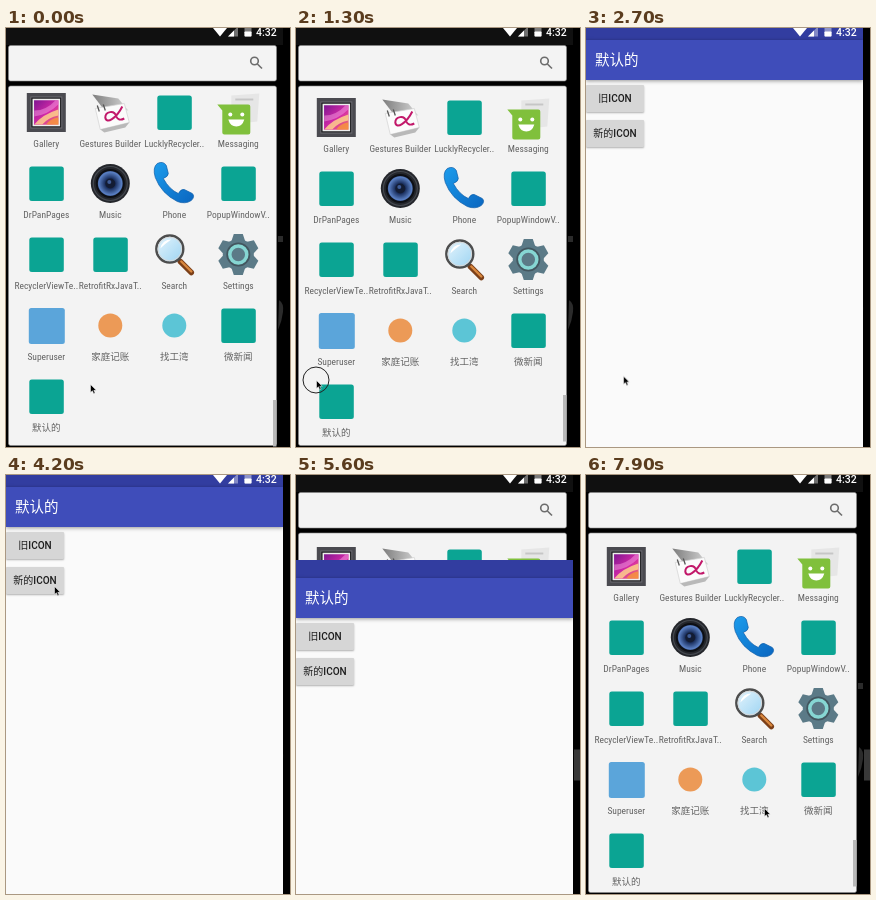
Animation of 284 by 419 pixels, one loop 8 s. Source, as an HTML page:

```html
<!DOCTYPE html>
<html lang="zh-CN">
<head>
<meta charset="utf-8">
<title>App drawer</title>
<style>
  html, body { margin: 0; width: 100%; height: 100%; overflow: hidden; background: #000; }
  body { position: relative; font-family: Roboto, "Noto Sans CJK SC", "Noto Sans CJK", sans-serif; }
  svg { position: absolute; left: 0; top: 0; display: block; }
  .label { font-size: 9.5px; font-family: "Roboto Condensed", Roboto, "Noto Sans CJK SC", "Noto Sans CJK", sans-serif; font-stretch: 75%; fill: #636363; text-anchor: middle; }
  .panel { fill: #f3f3f3; stroke: #8c8c8c; stroke-opacity: .6; }

  #grid   { animation: scroll 8s linear infinite; }
  #thumb  { animation: thumb 8s linear infinite; }
  #cursor { animation: move 8s linear infinite; }
  #ring   { animation: press 8s step-end infinite; }
  #hover  { animation: hover 8s step-end infinite; }

  #app {
    position: absolute; left: 0; top: -6px; width: 277px; height: 425px;
    background: #fafafa; animation: app 8s step-end infinite;
  }
  #app .status { height: 18px; background: #323da0; }
  #app .bar {
    height: 40px; background: #3f4dba; color: #fff; font-size: 14.5px; line-height: 41px;
    padding-left: 9px; box-shadow: 0 1px 4px rgba(0,0,0,.4);
  }
  #app .btn {
    position: absolute; left: 0; width: 58px; height: 27px; border-radius: 1px;
    background: #d6d6d6; color: #1c1c1c; font-size: 10px; font-weight: 500; line-height: 27px;
    text-align: center; box-shadow: 0 1px 2px rgba(0,0,0,.3);
  }

  @keyframes scroll {
    0%, 1.25% { transform: translateY(0); }
    11.25%, 12.5% { transform: translateY(2px); }
    16.25%, 17.5% { transform: translateY(5px); }
    26.25%, 100% { transform: translateY(7px); }
  }
  @keyframes thumb {
    0%, 1.25% { transform: translateY(0); }
    11.25%, 12.5% { transform: translateY(-2px); }
    16.25%, 17.5% { transform: translateY(-5px); }
    26.25%, 100% { transform: translateY(-7px); }
  }
  @keyframes move {
    0%, 1.25% { transform: translate(84px, 356px); }
    10%, 12.5% { transform: translate(16px, 355px); }
    16.25%, 17.5% { transform: translate(20px, 352px); }
    21.25% { transform: translate(22px, 356px); }
    26.25%, 31.25% { transform: translate(35px, 374px); }
    33.75% { transform: translate(37px, 348px); }
    45% { transform: translate(46px, 114px); }
    50%, 57.5% { transform: translate(48px, 111px); }
    66.25%, 78.75% { transform: translate(287px, 288px); }
    88.75%, 93.75% { transform: translate(214px, 282px); }
    98.75%, 100% { transform: translate(178px, 333px); }
  }
  @keyframes press {
    0% { opacity: 0; }
    10% { opacity: 1; }
    21.25% { opacity: 0; }
    27.5% { opacity: 1; }
    28.75%, 100% { opacity: 0; }
  }
  @keyframes hover {
    0% { opacity: 0; }
    66.25%, 100% { opacity: 1; }
  }
  @keyframes app {
    0% { clip-path: inset(100% 0 0 0); transform: translateY(0); }
    28.75% { clip-path: inset(300px 190px 0 0); }
    30% { clip-path: inset(120px 70px 0 0); }
    31.25%, 100% { clip-path: inset(0 0 -8px 0); }
    68.75% { transform: translateY(14px); }
    70% { transform: translateY(91px); }
    71.25% { transform: translateY(270px); }
    72.5%, 100% { transform: translateY(440px); }
  }
</style>
</head>
<body>
<svg width="284" height="419" viewBox="0 0 284 419">
  <defs>
    <linearGradient id="sunset" x1="0" y1="0" x2="1" y2="1">
      <stop offset="0" stop-color="#7a1590"/><stop offset=".55" stop-color="#d62aa8"/><stop offset="1" stop-color="#f08a5a"/>
    </linearGradient>
    <linearGradient id="fold">
      <stop offset="0" stop-color="#7d7d7d"/><stop offset="1" stop-color="#d5d5d5"/>
    </linearGradient>
    <radialGradient id="cone">
      <stop offset="0" stop-color="#0d1426"/><stop offset=".4" stop-color="#1c3160"/><stop offset=".85" stop-color="#5a80c4"/><stop offset="1" stop-color="#2a3c63"/>
    </radialGradient>
    <linearGradient id="blue" x1="0" y1="0" x2="1" y2="1">
      <stop offset="0" stop-color="#1c9cec"/><stop offset="1" stop-color="#0a66c0"/>
    </linearGradient>
    <linearGradient id="glass" x1="0" y1="0" x2="1" y2="1">
      <stop offset="0" stop-color="#e6f5fd"/><stop offset="1" stop-color="#9bd3f2"/>
    </linearGradient>

    <g id="gallery">
      <rect x="-19.5" y="-19.5" width="39" height="39" fill="#4a4a50"/>
      <rect x="-15.5" y="-15.5" width="31" height="31" fill="#1d1d20" stroke="#6c6c72"/>
      <rect x="-13" y="-13" width="26" height="26" fill="url(#sunset)" stroke="#eee" stroke-width="1.5"/>
      <path d="M-12 12 Q-4 2 12-3 V3 Q2 5-4 12Z" fill="#ffd98a" opacity=".8"/>
      <path d="M0 12 Q4 6 12 5 V12Z" fill="#f7943c" opacity=".8"/>
      <path d="M-12-2 Q0-2 9-12 H12 V-8 Q2 2-12 4Z" fill="#f49be0" opacity=".5"/>
    </g>
    <g id="gesture">
      <path d="M-18-18 L8-14 L18-2 L-8-5Z" fill="url(#fold)"/>
      <path d="M-15-4 L14-9 L19 10 L-10 17Z" fill="#fbfbfb" stroke="#d2d2d2" stroke-width=".7"/>
      <path d="M-10 17 L19 10 L15 15 L-6 20Z" fill="#b9b9b9"/>
      <path d="M12-6 C6 6-4 12-5 5 C-5-1 4-3 6 4 Q8 9 14 6" fill="none" stroke="#c2186a" stroke-width="2"/>
      <path d="M-13-7 l2 6 M-7-8 l2 6" stroke="#555" stroke-width="1.3"/>
    </g>
    <g id="chat">
      <path d="M-7-17 L21-19 L19 9 L-7 12Z" fill="#e6e6e6"/>
      <path d="M-3-13 H15" stroke="#c6c6c6" stroke-width="2"/>
      <path d="M-21-8 H10 Q12-8 12-6 V20 Q12 22 10 22 H-14 Q-16 22-16 20 V-2Z" fill="#80c03c"/>
      <circle cx="-8" cy="2" r="2" fill="#fff"/><circle cx="4" cy="2" r="2" fill="#fff"/>
      <path d="M-10 7 H6 Q4 14-2 14 T-10 7Z" fill="#fff"/>
    </g>
    <g id="music">
      <circle r="19.5" fill="#24262b"/>
      <circle r="17" fill="none" stroke="#44484f" stroke-width="1.2"/>
      <circle r="13.5" fill="url(#cone)" stroke="#0d0f14" stroke-width="2"/>
      <circle r="5" fill="#131c33"/><circle cx="-1" cy="-1.5" r="2" fill="#3f5c97"/>
    </g>
    <path id="phone" d="M-17-20 Q-11-23-8-18 L-6-10 Q-6-7-11-5 Q-5 6 4 10 Q7 5 10 6 L18 10 Q21 13 17 17 Q11 21 3 18 Q-13 10-19-6 Q-22-16-17-20Z" fill="url(#blue)" stroke="#0d5ca8" stroke-width=".7"/>
    <g id="search">
      <path d="M6 7 L17 18" stroke="#7b3f18" stroke-width="5.5" stroke-linecap="round"/>
      <path d="M7 7 L17 17" stroke="#d9883e" stroke-width="2.4" stroke-linecap="round"/>
      <circle cx="-4.5" cy="-5.5" r="13.5" fill="url(#glass)" stroke="#4d4d4d" stroke-width="2.4"/>
      <circle cx="-4.5" cy="-5.5" r="11.8" fill="none" stroke="#d8d8d8"/>
      <path d="M-14-6 Q-12-15-3-15 Q-9-11-14-6Z" fill="#fff"/>
    </g>
    <g id="settings">
      <g id="teeth" fill="#5b7a87"></g>
      <circle r="15.5" fill="#5b7a87"/>
      <circle r="12" fill="#43565f"/>
      <circle r="8.5" fill="#5b7a87" stroke="#86d6d3" stroke-width="3.5"/>
    </g>
    <rect id="teal" x="-17" y="-17" width="34.5" height="34.5" rx="2.5" fill="#0ba493"/>
    <rect id="sky" x="-17.5" y="-17.5" width="36" height="36" rx="2.5" fill="#5ba5da"/>
    <circle id="orange" r="12" fill="#ec9a57"/>
    <circle id="cyan" r="12" fill="#5cc5d6"/>
  </defs>

  <rect width="284" height="419" fill="#000"/>
  <rect width="277" height="17" fill="#101010"/>
  <path d="M272 208 h5 v6 h-5Z M273 272 q5 3 4 12 t-5 18" fill="#2b2b2b"/>
  <rect class="panel" x="2.5" y="17.5" width="268" height="35.5" rx="2"/>
  <g fill="none" stroke="#6c6c6c" stroke-width="1.6"><circle cx="248.5" cy="33" r="3.8"/><path d="M251.4 36 L256 40.5"/></g>
  <rect class="panel" x="2.5" y="58" width="268" height="359.5" rx="2"/>
  <g id="grid"></g>
  <rect id="thumb" x="267" y="372" width="3.5" height="46.5" fill="#b8b8b8"/>
</svg>

<div id="app">
  <div class="status"></div>
  <div class="bar">默认的</div>
  <div class="btn" style="top:62.5px">旧ICON</div>
  <div class="btn" style="top:97.5px">新的ICON</div>
</div>

<svg width="284" height="419" viewBox="0 0 284 419">
  <g fill="#fff">
    <path d="M207 0 H221 L214 8.5Z"/>
    <path d="M222 8.5 L232-1.5 V8.5Z" opacity=".4"/>
    <path d="M222 8.5 L228 2.5 V8.5Z"/>
    <rect x="238.5" y="-1" width="7" height="9.5" rx=".7" opacity=".45"/>
    <rect x="238.5" y="3.5" width="7" height="5" rx=".7"/>
    <text x="250" y="7.5" font-size="10.5" font-weight="500">4:32</text>
  </g>
  <rect id="hover" x="278" y="274.5" width="6" height="31" fill="#383838"/>
  <g id="cursor">
    <circle id="ring" r="13" fill="none" stroke="#222" stroke-width="1"/>
    <path d="M.5 .5 V8.5 L2.4 6.8 L3.7 9.7 L5.1 9.1 L3.8 6.3 H6.3Z" fill="#000" stroke="#fff" stroke-width=".5"/>
  </g>
</svg>

<script>
  const apps = [
    ["gallery", "Gallery"], ["gesture", "Gestures Builder"], ["teal", "LucklyRecycler.."], ["chat", "Messaging"],
    ["teal", "DrPanPages"], ["music", "Music"], ["phone", "Phone"], ["teal", "PopupWindowV.."],
    ["teal", "RecyclerViewTe.."], ["teal", "RetrofitRxJavaT.."], ["search", "Search"], ["settings", "Settings"],
    ["sky", "Superuser"], ["orange", "家庭记账"], ["cyan", "找工湾"], ["teal", "微新闻"],
    ["teal", "默认的"]
  ];

  document.getElementById("teeth").innerHTML = Array.from({ length: 6 }, (_, i) =>
    `<path d="M-7-13 L-4.5-20.5 H4.5 L7-13Z" transform="rotate(${i * 60})"/>`).join("");

  document.getElementById("grid").innerHTML = apps.map(([icon, name], i) => {
    const x = 40.3 + (i % 4) * 64;
    const y = 84.5 + Math.floor(i / 4) * 71;
    return `<use href="#${icon}" x="${x}" y="${y}"/><text class="label" x="${x}" y="${y + 34.5}">${name}</text>`;
  }).join("");
</script>
</body>
</html>
```
